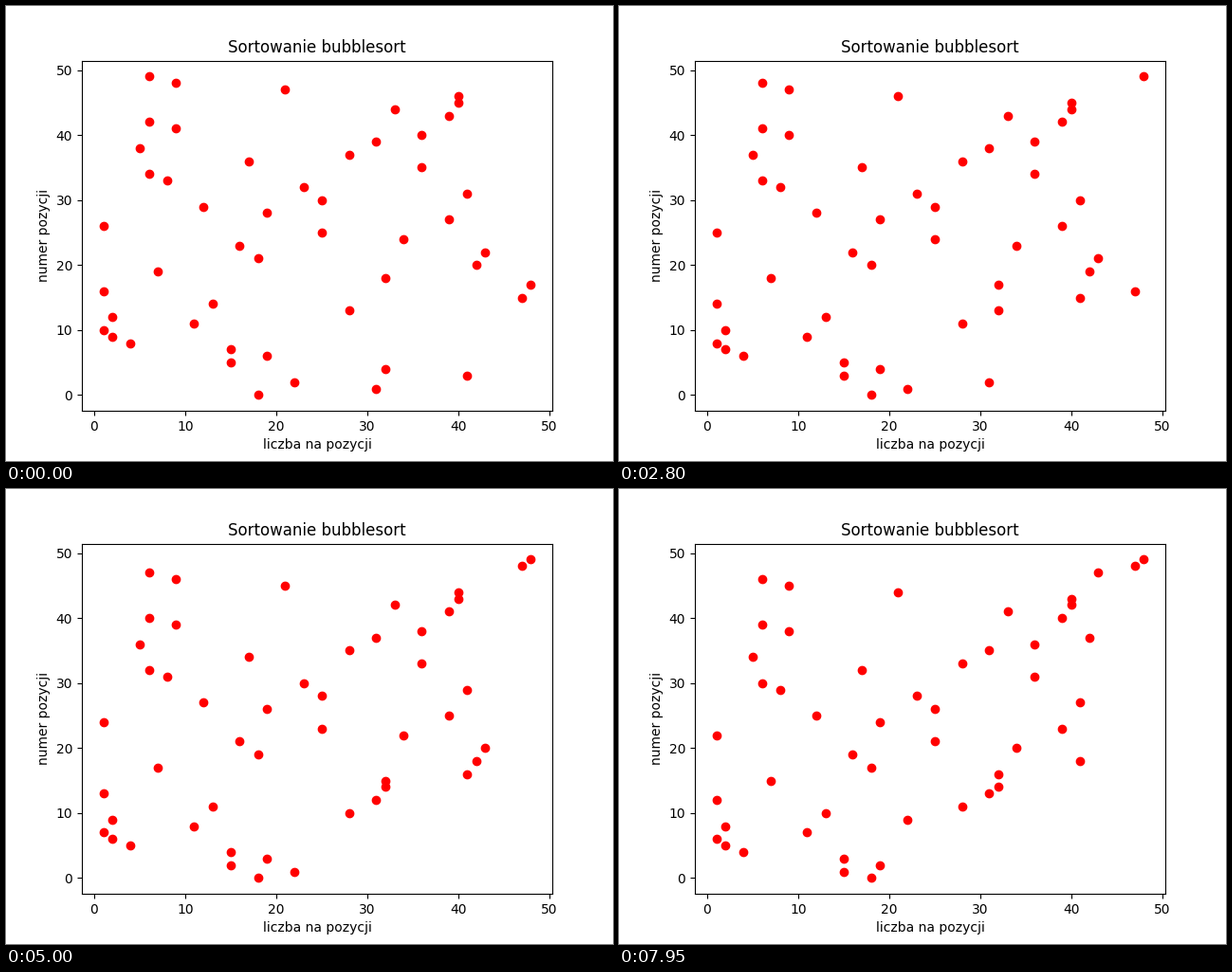
A matplotlib script for the animation above (8 s loop, 640 by 480 pixels).

```python
import matplotlib.pyplot as plt
from matplotlib.animation import FuncAnimation

FRAMES = 160
INTERVAL = 50

START = [18, 31, 22, 41, 32, 15, 19, 15, 4, 2,
         1, 11, 2, 28, 13, 47, 1, 48, 32, 7,
         42, 18, 43, 16, 34, 25, 1, 39, 19, 12,
         25, 41, 23, 8, 6, 36, 17, 28, 5, 31,
         36, 9, 6, 39, 33, 40, 40, 21, 9, 6]


def bubble_states(values, count):
    """Return the list after each swap, starting with the unsorted one."""
    values = list(values)
    states = [values[:]]
    for end in range(len(values) - 1, 0, -1):
        for i in range(end):
            if values[i] > values[i + 1]:
                values[i], values[i + 1] = values[i + 1], values[i]
                states.append(values[:])
                if len(states) == count:
                    return states
    return states


states = bubble_states(START, FRAMES)
positions = range(len(START))

fig, ax = plt.subplots(figsize=(6.4, 4.8), dpi=100)
dots, = ax.plot(START, positions, "ro")
ax.set_title("Sortowanie bubblesort")
ax.set_xlabel("liczba na pozycji")
ax.set_ylabel("numer pozycji")


def draw(frame):
    dots.set_data(states[frame], positions)
    return dots,


anim = FuncAnimation(fig, draw, frames=FRAMES, interval=INTERVAL, repeat=True)
plt.show()
```
